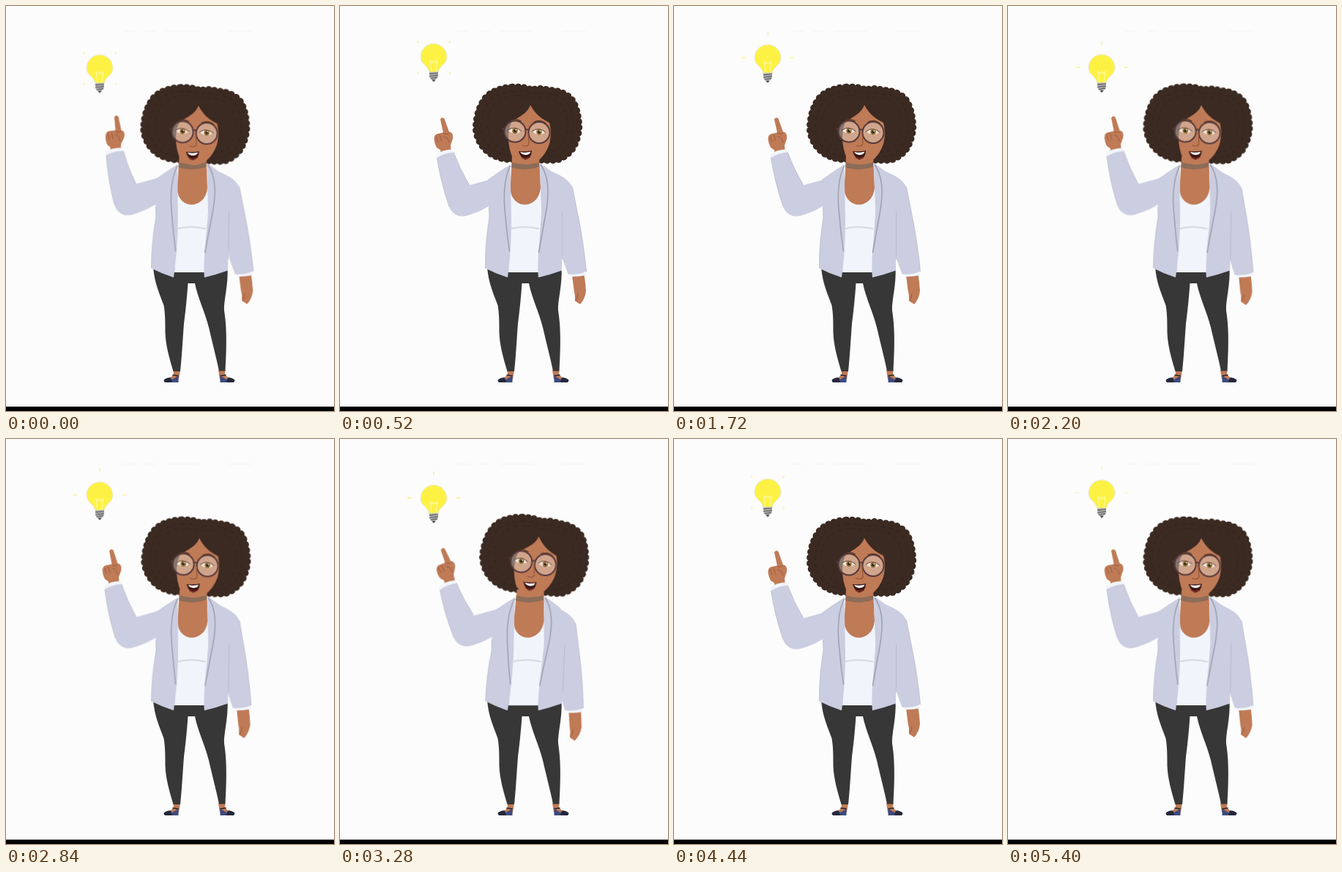
These frames come from a looping animation (448 by 552 pixels, 5440 ms). An HTML page:

```html
<!DOCTYPE html>
<html lang="en">
<head>
<meta charset="utf-8">
<title>Bright idea</title>
<style>
html, body { margin: 0; width: 100%; height: 100%; overflow: hidden; background: #fcfcfc; }
svg { display: block; width: 448px; height: 552px; }

.head, .torso, .arm, .forearm, .hand, .side {
  animation: 5440ms ease-in-out infinite;
}
.head { animation-name: head; transform-origin: 252px 212px; }
.torso { animation-name: torso; transform-origin: 0 365px; }
.arm { animation-name: arm; }
.forearm { animation-name: forearm; transform-origin: 164px 266px; }
.hand { animation-name: hand; transform-origin: 144px 199px; }
.side { animation-name: side; transform-origin: 310px 240px; }

/* Poses: wind-up, swing, rest, ready */
@keyframes head {
  0%, 55.1% { transform: translate(1.5px, .8px) rotate(1deg); }
  2.9%, 5.1%, 58.1%, 60.2% { transform: translate(5.5px, -3px) rotate(5deg); animation-timing-function: ease-out; }
  9%, 37.9%, 64.2%, 93.7% { transform: translate(0, 0) rotate(0deg); }
  40.4%, 52.4%, 96.3%, 100% { transform: translate(2.4px, 0) rotate(1.2deg); }
}
@keyframes torso {
  0%, 55.1% { transform: skewX(-.6deg); }
  2.9%, 5.1%, 58.1%, 60.2% { transform: skewX(-2.45deg); animation-timing-function: ease-out; }
  9%, 37.9%, 64.2%, 93.7% { transform: skewX(0deg); }
  40.4%, 52.4%, 96.3%, 100% { transform: skewX(-.8deg); }
}
@keyframes arm {
  0%, 55.1% { transform: translate(-1.5px, -1.5px); }
  2.9%, 5.1%, 58.1%, 60.2% { transform: translate(2px, -4px); animation-timing-function: ease-out; }
  9%, 37.9%, 64.2%, 93.7% { transform: translate(0, 0); }
  40.4%, 52.4%, 96.3%, 100% { transform: translate(-.8px, -1.5px); }
}
@keyframes forearm {
  0%, 55.1% { transform: rotate(4deg); }
  2.9%, 5.1%, 58.1%, 60.2% { transform: rotate(-4.5deg); animation-timing-function: ease-out; }
  9%, 37.9%, 64.2%, 93.7% { transform: rotate(0deg); }
  40.4%, 52.4%, 96.3%, 100% { transform: rotate(1deg); }
}
@keyframes hand {
  0%, 55.1% { transform: translate(0, 0) rotate(3deg); }
  2.9%, 5.1%, 58.1%, 60.2% { transform: translate(1.5px, -2.5px) rotate(-4deg); animation-timing-function: ease-out; }
  9%, 37.9%, 64.2%, 93.7% { transform: translate(0, 0) rotate(0deg); }
  40.4%, 52.4%, 96.3%, 100% { transform: translate(0, 0) rotate(0deg); }
}
@keyframes side {
  0%, 55.1% { transform: translate(0, 0) rotate(-.6deg); }
  2.9%, 5.1%, 58.1%, 60.2% { transform: translate(0, 4.5px) rotate(2deg); animation-timing-function: ease-out; }
  9%, 37.9%, 64.2%, 93.7% { transform: translate(0, 0) rotate(0deg); }
  40.4%, 52.4%, 96.3%, 100% { transform: translate(0, 1px) rotate(.8deg); }
}

/* The bulb bobs once a second; the loop cuts it short */
.bulb { animation: bob 5440ms cubic-bezier(.37, 0, .63, 1) infinite; }
@keyframes bob {
  0% { transform: translateY(-.4px); animation-timing-function: ease-out; }
  1.84%, 20.22%, 38.6%, 56.99%, 75.37% { transform: translateY(.8px); }
  11.03%, 29.41%, 47.79%, 66.18%, 84.56% { transform: translateY(-16.6px); }
  93.75% { transform: translateY(.8px); animation-timing-function: cubic-bezier(.42, 0, .8, .75); }
  100% { transform: translateY(-13.5px); }
}
.cross, .diag {
  fill: none; stroke: #fbe95e; stroke-width: 1.3; stroke-linecap: round;
  animation: cross calc(5440ms / 11) linear infinite;
}
.diag { animation-name: diag; }
@keyframes cross {
  0%, 29% { opacity: 0; transform: scale(.96); }
  43% { opacity: .75; }
  63% { opacity: .9; transform: scale(1); }
  92% { opacity: .4; transform: scale(1.02); }
  94%, 100% { opacity: 0; transform: scale(1.02); }
}
@keyframes diag {
  0%, 5% { opacity: .85; }
  28%, 94% { opacity: 0; }
  98% { opacity: .6; }
  100% { opacity: .85; }
}

.skin { fill: #bf7a56; }
.coat { fill: #cbcde0; }
.white { fill: #f1f5fb; }
.line { fill: none; stroke-linecap: round; stroke-linejoin: round; }
.crease { stroke: #95573a; stroke-width: .9; }
.seam { stroke: #b4b6c6; stroke-width: .7; }
.lapel { stroke: #9d9fac; stroke-width: 1.5; }
.curls { stroke-linecap: round; fill: none; }
</style>
</head>
<body>
<svg viewBox="0 0 448 552">
  <defs>
    <path id="mane" d="M234 111C226 111 222 113 217 114C206 118 200 123 197 128C190 138 187 150 186 163C185 174 190 184 194 190C202 201 214 208 232 209L284 210C291 210 296 210 301 208C311 203 316 197 319 192C324 182 327 170 326 160C325 149 323 139 318 130C312 121 300 115 285 115C274 112 268 113 262 115C255 111 244 110 234 111Z"/>
    <g id="lens">
      <circle r="14.5" fill="#eadfd6" fill-opacity=".42"/>
      <path d="M-9-1Q-1-8 8 0Q0 6-9-1Z" fill="#f1e9dd"/>
      <circle cy="-.8" r="3.7" fill="#8b6a30"/>
      <circle cy="-.8" r="1.7" fill="#2a1a12"/>
      <circle cx="1.3" cy="-2.2" r=".9" fill="#fff"/>
      <path class="line" d="M-10-1.500Q-1-9 9-.5" stroke="#6b4c3e"/>
      <circle r="14.500" fill="none" stroke="#573a3b" stroke-width="2"/>
    </g>
    <g id="foot">
      <path class="skin" d="M228.500 496H238L236 509H221Q226 506 229 502Z"/>
      <path d="M215.500 510Q219 507 223 506.500L227 509L235.500 504V513H217Z" fill="#3c4b7e"/>
      <path d="M215.500 510Q219 506 225 506.500L227 513H217Z" fill="#25283a"/>
      <path class="line" d="M228 503L235 504" stroke="#25242c" stroke-width="1.500"/>
    </g>
  </defs>

  <rect width="448" height="552" fill="#fcfcfc"/>
  <path d="M160 34H177M190 34H205M218 34H264M303 34H336" stroke="#f4f4f4"/>

  <g class="bulb">
    <g transform="translate(128 85)">
      <path class="cross" d="M-35.500-.5H-31M31.500-.5H35.500M0-36V-32"/>
      <path class="diag" d="M-22.500-21.500L-21-20M22.500-21.500L21-20M-22.500 22.500L-21 21M22.500 22.500L21 21"/>
      <path d="M-18 0A18 18 0 1 1 18 0C18 10 7 12 6.500 20.500H-6.500C-7 12-18 10-18 0Z" fill="#fdf243" stroke="#e8e7d8"/>
      <path class="line" d="M-3 19L-5 5L-2 8L0 5L2 8L5 5L3 19" stroke="#fff8a0" stroke-width="1.200"/>
      <path d="M-6 20.500H6L5.500 28L2 32Q0 34-2 32L-5.500 28Z" fill="#b9b9b9"/>
      <path class="line" d="M-5.500 23L5.500 21.800M-5.500 26.300L5.500 25M-4 29.300L4.500 28" stroke="#5c5c5c" stroke-width="1.300"/>
      <path d="M-2.500 31H2.500L0 34Z" fill="#444"/>
    </g>
  </g>

  <use href="#foot"/>
  <use href="#foot" transform="translate(528 0) scale(-1 1)"/>
  <path d="M201 356H302.500C304 380 297 402 298 415C301 435 302 455 299.500 497.500H291C287 478 282 460 277 438C271 415 262 398 258 378H248.500C247 400 245 418 243 433C241 460 240 480 238 498H228.500C223 480 218 462 217.500 445C217.500 430 217.500 420 215.500 408C209 390 203 378 201 356Z" fill="#373737"/>

  <g class="head">
    <use href="#mane" fill="#3b2a22"/>
    <use href="#mane" class="curls" stroke="#3b2a22" stroke-width="10" stroke-dasharray="0 7.800"/>
    <g class="curls" stroke="#2d1e19" stroke-width="1.800" opacity=".4">
      <use href="#mane" transform="translate(25.700 16.200) scale(.9)" stroke-dasharray="4 7"/>
      <use href="#mane" transform="translate(56.500 35.600) scale(.78)" stroke-dasharray="5 8"/>
    </g>
  </g>

  <g class="torso">
    <path class="white" d="M232 248L230 363H273L275 248Z"/>
    <path class="line" d="M233 303.500Q252 299 271 303.500" stroke="#d5d9df" stroke-width="2"/>
    <path class="skin" d="M235 205L232.500 250C235 278 271 278 274 248L272 205Z"/>
    <path d="M235 213Q253 219 272 213V219Q253 226 234 220Z" fill="#8c6c58"/>

    <g class="arm">
      <path class="coat" d="M174 245L203 237L216 233L224 266L203 273Q186 283 170 286.500Q154 285 153 268Z"/>
      <g class="forearm">
        <g class="hand">
          <path class="skin" d="M137 154.500Q139 150.500 142.500 153.500L149 171.500Q155 172 154 181L151 190L152 200L138 203L137 196Q130 194 128.500 182Q128 175 134 174L141 172.500Z"/>
          <path class="line crease" d="M141 173Q145 176 149 173M136 176L139 184M142 178Q148 179 149 186M131.500 178L134 185"/>
        </g>
        <path class="white" d="M131.500 202Q142 195 153.500 195.500L156 201L133 209Z"/>
        <path class="coat" d="M132.500 207Q143 200 155.300 199.500Q164 223 177 244L178 283Q169 288 162 286Q152 283 149 273Q138 242 132.500 207Z"/>
        <path class="line seam" d="M132.500 207Q138 242 149 273M155.300 199.500Q164 223 176 243"/>
      </g>
    </g>

    <g class="side">
      <path class="skin" d="M317 367L333.500 366Q335 376 336 388Q335 399 328 406.500L321 402Q321.500 394 319.500 387Z"/>
      <path class="line crease" d="M322 401Q325 398 325 392"/>
      <path class="white" d="M313 363L335 360L336 367Q326 369 315 369Z"/>
      <path class="coat" d="M288 225L299 230Q313 237 317.500 247Q323 275 328 300Q334 335 336.500 361.500Q325 367 311.500 365.500L304 345L298 300Z"/>
      <path class="line seam" d="M317.500 247Q323 275 328 300Q334 335 336.500 361.500"/>
    </g>

    <path class="coat" d="M232.500 216Q218 225 202 236.500Q205 258 203.500 273L204 288Q198 325 198.500 357.500Q213 365 229 370C232.500 345 234 320 234 290L232.500 216Z"/>
    <path class="coat" d="M273 214Q283 221 295 230L303 250V360.500Q288 366 271 370C269 345 273 320 275 280Z"/>
    <path class="line lapel" d="M232.500 218C223 237 223 262 226 287Q228 312 231.500 334M274.500 217C285 232 286 255 281.500 280Q276 310 271.500 336"/>
    <path class="line seam" d="M203.500 274L204 288Q198 325 198.500 357M303.500 280V345"/>
  </g>

  <g class="head">
    <path class="skin" d="M260 135C255 148 244 150 234 159C228 170 229 190 235 205C243 214 250 216 257 216C268 215 280 206 286 188C288.500 178 288.500 168 286 159C276 154 267 148 260 135Z"/>
    <path class="line" d="M232 158Q239 152 247 157M265 158Q274 154 281 160" stroke="#5a3829" stroke-width="1.500"/>
    <use href="#lens" x="239" y="171"/>
    <use href="#lens" x="272" y="172.500"/>
    <path class="line" d="M253.500 169Q255.500 167 257.500 169.500M224.500 169L222 167" stroke="#573a3b" stroke-width="1.800"/>
    <path class="line" d="M257 174L258 188Q256 192.500 249 190" stroke="#95573a" stroke-width="1.200"/>
    <path d="M244 198Q254 199 262 197Q261.500 208.500 253 209.500Q246.500 207 244 198Z" fill="#3b1513"/>
    <path d="M246 199Q254 200.500 260.500 198.500Q259 203 253 203Q248 202.500 246 199Z" fill="#fff"/>
    <path class="line" d="M248.500 206.500Q253 209 258 206.500" stroke="#7b3129" stroke-width="1.700"/>
  </g>

  <rect y="546" width="448" height="6"/>
</svg>
</body>
</html>
```
